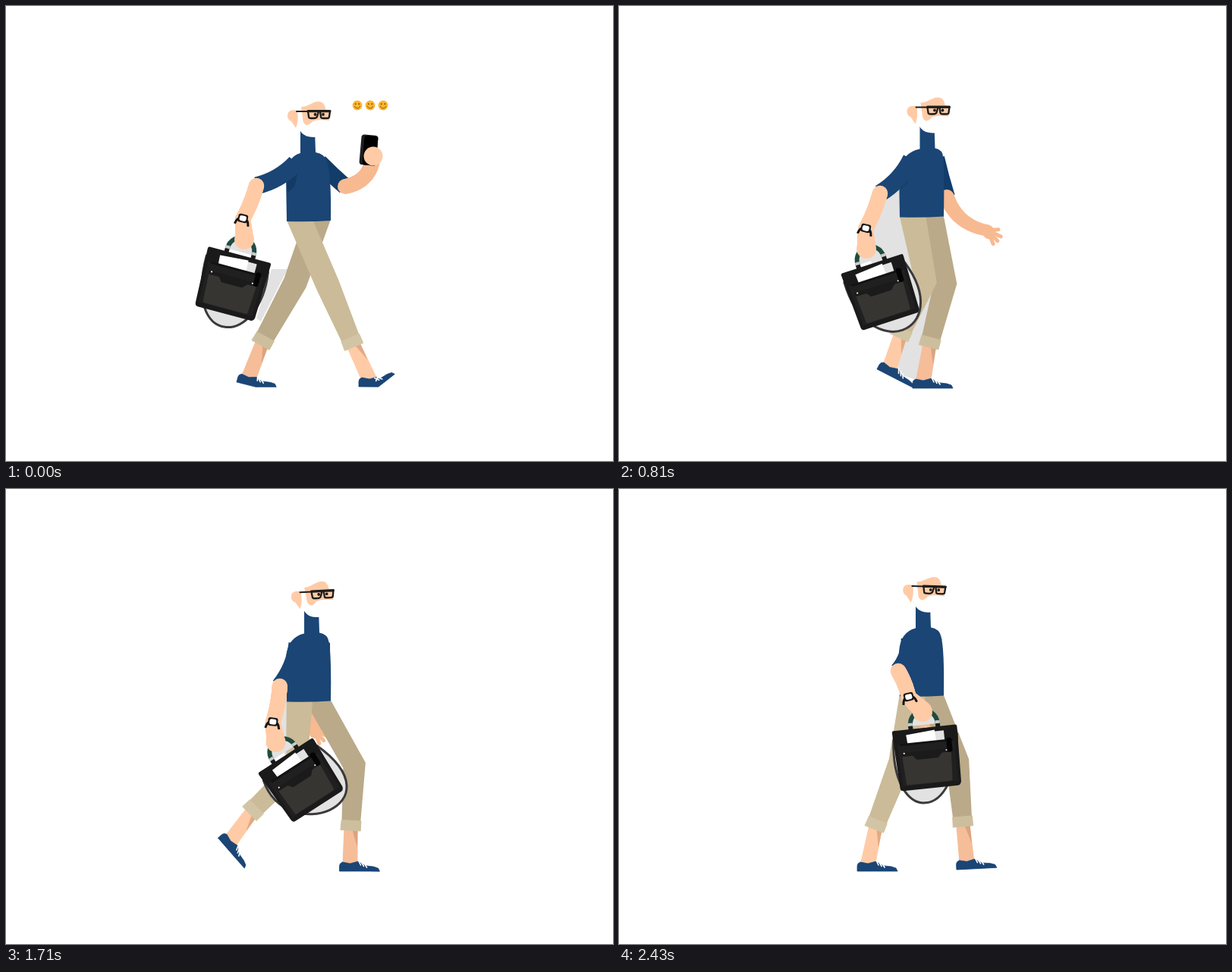
Animation of 800x600 px, one loop 2460 ms. Source, as an HTML page with a canvas:

```html
<!DOCTYPE html>
<html lang="en">
<head>
<meta charset="utf-8">
<title>Walking man</title>
<style>
html, body { margin: 0; width: 100%; height: 100%; overflow: hidden; background: #fff; }
canvas { display: block; width: 800px; height: 600px; }
</style>
</head>
<body>
<canvas id="stage" width="800" height="600"></canvas>
<script>
const g = document.getElementById('stage').getContext('2d');
const LOOP = 2460, CYCLE = 1005, STEP = 30, RAD = Math.PI / 180;
const BLUE = '#1a4575', BLUE_FAR = '#123c69', SKIN = '#ffcba6', SKIN_FAR = '#f7ba91', GREY = '#e2e2e2';

// Every row starts with its phase in the walk cycle.
// Leg: knee x y, cuff x y, heel x y, foot angle, toe curl.
const LEG = [
  [0, 424, 368, 456, 443, 465, 502, 0, -38],
  [.195, 436, 364, 433, 443, 418.5, 504, 0, 0],
  [.27, 420, 370, 400, 446, 379, 504, 0, 0],
  [.306, 406, 366, 386, 443, 363, 504, 0, 0],
  [.418, 371, 360, 339, 442, 314, 504, 0, 0],
  [.5, 357, 365, 315, 441, 280, 496, 14, -14],
  [.698, 382, 367, 325, 423, 278, 460, 49, 0],
  [.77, 396, 366, 350, 432, 314, 471, 37, 0],
  [.806, 404, 363, 372, 431, 340, 479, 27, 0],
  [.918, 422, 360, 429, 438, 421, 502, -3, 0]
];
// Near arm: elbow, wrist, hand.
const ARM = [
  [0, 330, 237, 312, 281, 314, 306],
  [.194, 358, 258, 346, 306, 346, 330],
  [.27, 369, 261, 369, 306, 374, 330],
  [.418, 368, 240, 382, 275, 400, 292],
  [.5, 370, 238, 388, 272, 408, 288],
  [.70, 361, 260, 352, 308, 356, 332],
  [.806, 344, 247, 325, 294, 326, 318]
];
// Bag: tilt, then the two strap handles relative to the bag's top.
const BAG = [
  [0, 15, -76, 123, 26, 123],
  [.194, 26, -152, 80, 7, 138],
  [.27, 16, -118, 88, 2, 148],
  [.418, -6, -44, 128, 46, 128],
  [.70, -33, 1, 120, 151, 65],
  [.806, -18, -4, 135, 111, 90]
];
// Far arm: elbow, wrist, bow.
const FAR_ARM = [
  [0, 441, 256, 505, 303, 13],
  [.194, 423, 258, 443, 326, 5],
  [.418, 405, 245, 392, 305, 5],
  [.70, 417, 258, 405, 318, 5],
  [.806, 432, 252, 486, 296, 20]
];
// Body, once per step: lean, bob, head tilt.
const BODY = [[0, 0, 0, 0], [.2, 5, -3.5, -3], [.306, 8.5, -5.5, 0], [.418, 3, -10.5, 2]];

const mod = (a, n) => ((a % n) + n) % n;
const mix = (a, b, u) => a.map((v, i) => v + (b[i] - v) * u);
const ease = u => u * u * (3 - 2 * u);

// Smooth periodic curve through the rows.
function sample(rows, phase, period = 1) {
  const n = rows.length, p = mod(phase, period);
  let i = n - 1;
  while (rows[i][0] > p) i--;
  const row = k => rows[mod(k, n)];
  const time = k => row(k)[0] + Math.floor(k / n) * period;
  const slope = (k, c) => (row(k + 1)[c] - row(k)[c]) / (time(k + 1) - time(k));
  const tangent = (k, c) => {
    const h0 = time(k) - time(k - 1), h1 = time(k + 1) - time(k);
    return (slope(k - 1, c) * h1 + slope(k, c) * h0) / (h0 + h1);
  };
  const h = time(i + 1) - time(i), u = (p - time(i)) / h, w = ease(u);
  return row(i).slice(1).map((v, j) => v * (1 - w) + row(i + 1)[j + 1] * w +
    h * u * (1 - u) * ((1 - u) * tangent(i, j + 1) - u * tangent(i + 1, j + 1)));
}

function turn(x, y, deg) {
  const c = Math.cos(deg * RAD), s = Math.sin(deg * RAD);
  return [x * c - y * s, x * s + y * c];
}
function right(a, b) {
  const x = b[0] - a[0], y = b[1] - a[1], l = Math.hypot(x, y) || 1;
  return [y / l, -x / l];
}
const off = (p, n, d) => [p[0] + n[0] * d, p[1] + n[1] * d];
// Control point bowed to the left of the way from a to b.
const bowed = (a, b, d) => off(mix(a, b, .5), right(a, b), -d);

function poly(color, pts, soft = 0) {
  g.beginPath();
  pts.forEach(p => g.lineTo(p[0], p[1]));
  g.closePath();
  g.fillStyle = color;
  g.fill();
  if (soft) stroke(color, soft);
}
function stroke(color, width, cap = 'round') {
  g.strokeStyle = color;
  g.lineWidth = width;
  g.lineCap = cap;
  g.lineJoin = 'round';
  g.stroke();
}
function line(color, width, a, b, cap) {
  g.beginPath();
  g.moveTo(...a);
  g.lineTo(...b);
  stroke(color, width, cap);
}
function dot(color, x, y, r) {
  g.beginPath();
  g.arc(x, y, r, 0, 7);
  g.fillStyle = color;
  g.fill();
}
function shape(color, d) {
  g.fillStyle = color;
  g.fill(new Path2D(d));
}
function box(color, x, y, w, h, r) {
  g.beginPath();
  g.roundRect(x, y, w, h, r);
  g.fillStyle = color;
  g.fill();
}
function curve(color, width, a, c, b) {
  g.beginPath();
  g.moveTo(...a);
  g.quadraticCurveTo(...c, ...b);
  stroke(color, width, 'butt');
}
// Rounded limb that tapers along a curve.
function tube(color, a, c, b, w0, w1) {
  for (let i = 0; i <= 40; i++) {
    const u = i / 40, p = mix(mix(a, c, u), mix(c, b, u), u);
    dot(color, p[0], p[1], (w0 + (w1 - w0) * u) / 2);
  }
}
function placed(x, y, deg, draw) {
  g.save();
  g.translate(x, y);
  g.rotate(deg * RAD);
  draw();
  g.restore();
}

function legPose(phase, dx) {
  const [kx, ky, cx, cy, hx, hy, angle, curl] = sample(LEG, phase);
  return { knee: [kx + dx, ky], cuff: [cx + dx, cy], heel: [hx + dx, Math.min(hy, 504)], angle, curl };
}

function drawLeg(leg, hip, cloth, hem, skin, shade) {
  const { knee, cuff, heel, angle, curl } = leg;
  const at = (x, y) => {
    if (x > 26) {
      const t = turn(x - 26, y, curl);
      x = 26 + t[0];
      y = t[1];
    }
    const t = turn(x, y, angle);
    return [heel[0] + t[0], heel[1] + t[1]];
  };
  const ankle = at(14, -9), na = right(cuff, ankle);
  const ns = right(knee, cuff), nk = mix(right(hip, knee), ns, .5);
  const along = [-ns[1], ns[0]];
  poly(skin, [off(cuff, na, -9), off(cuff, na, 9), off(ankle, na, 10), off(ankle, na, -10)]);
  poly(shade, [cuff, off(cuff, na, 9), off(mix(cuff, ankle, .55), na, 9)]);
  poly(cloth, [off(hip, [1, 0], -16.5), off(knee, nk, -15), off(cuff, ns, -11.5),
    off(cuff, ns, 11.5), off(knee, nk, 15), off(hip, [1, 0], 16.5)], 1.5);
  const top = off(cuff, along, -6), low = off(cuff, along, 7);
  poly(hem, [off(top, ns, -13), off(top, ns, 13), off(low, ns, 13), off(low, ns, -13)], 1);

  const sole = [[0, 0], [0, -7], [1, -10], [4, -12], [14, -10], [25, -13], [30, -9], [36, -7],
    [45, -6], [51, -4], [53, 0], [40, 0], [26, 0]].map(p => at(...p));
  poly(BLUE, sole, .8);
  for (let i = 0; i < 3; i++) line('#fff', 1.6, at(25 + 4 * i, -14 + 2 * i), at(28 + 4 * i, -8 + 1.5 * i));
}

function drawFarArm(t, phase, lean, bob) {
  let pose = sample(FAR_ARM, phase);
  const holds = t < 480;
  let phoneTilt = 5;
  if (holds) {
    const u = ease(Math.min(t / 270, 1)), v = ease(Math.max(0, (t - 270) / 210));
    const held = mix([447, 238, 484, 198, 20], [432, 257, 487, 248, 23], u);
    pose = mix(held, pose, v);
    phoneTilt += 80 * u + 50 * v;
  }
  const [ex, ey, hx, hy, bow] = pose, elbow = [ex, ey], hand = [hx, hy];
  const shoulder = [413 + lean * .6, 206 + bob];
  curve(BLUE_FAR, 22, shoulder, bowed(shoulder, elbow, 1), elbow);
  tube(SKIN_FAR, elbow, bowed(elbow, hand, bow), hand, 20, holds ? 20 : 15);
  if (holds) {
    placed(hx, hy, phoneTilt - 5, () => placed(-6, -8, 5, () => {
      box('#1d1f22', -11, -20, 22, 40, 4);
      box('#000', -7, -19, 18, 39, 3);
    }));
    dot(SKIN, hx, hy, 12.5);
  } else {
    dot(SKIN_FAR, hx + 2, hy + 3, 8.5);
    [-5, 25, 47, 68].forEach((a, i) => {
      const tip = turn(i ? 19 : 14, 0, a);
      line(SKIN_FAR, 5, hand, [hx + tip[0], hy + tip[1]]);
    });
  }
}

function drawTorso(d, y) {
  shape(BLUE, `M${388 + d} ${164 + y} L${407 + d} ${164 + y} L${408 + d} ${193 + y}
    Q${420 + d * .8} ${195 + y} ${423 + d * .5} ${205 + y} Q429 ${222 + y} 428 ${283 + y}
    Q400 ${285 + y} 370 ${284 + y} L369 ${225 + y} Q${370 + d * .3} ${199 + y} ${388 + d} ${194 + y}Z`);
  poly('#143a66', [[370, 223 + y], [386, 215 + y], [380, 238 + y], [371, 247 + y]]);
}

function drawHead(d, y, tilt) {
  placed(398 + d, 150 + y, tilt, () => {
    g.translate(-398, -150);
    shape('#fff', 'M384 148 Q384 173 405 173 Q424 173 428 150Z');
    shape(SKIN, 'M384 138 Q372 135 371 144 Q371 150 376 152 L382 161 Q386 152 384 138Z');
    shape(SKIN, 'M389 133 C398 133 404 126 412 126 Q420 126 421 136 L427 139 L426 151 ' +
      'Q412 149 404 152 Q400 157 396 157 Q391 155 391 147Z');
    line('#1c1c1c', 2, [383, 139], [399, 139]);
    const lens = new Path2D('M398 139 H412 L410 146 Q409 148 406 148 H402 Q399 148 399 146Z ' +
      'M414 139 H427 L426 146 Q426 148 423 148 H418 Q415 148 415 146Z');
    g.fillStyle = SKIN;
    g.fill(lens);
    g.strokeStyle = '#1c1c1c';
    g.lineWidth = 2.3;
    g.stroke(lens);
    line('#1c1c1c', 3, [398, 138.5], [427, 138.5]);
    dot('#1c1c1c', 407.5, 143, 1.9);
    dot('#1c1c1c', 418, 143, 1.9);
  });
}

function drawStrap(top, tilt, s) {
  const end = x => {
    const e = turn(x, 12, tilt);
    return [top[0] + e[0], top[1] + e[1]];
  };
  g.beginPath();
  g.moveTo(...end(-42));
  g.bezierCurveTo(top[0] + s[0], top[1] + s[1], top[0] + s[2], top[1] + s[3], ...end(42));
  g.fillStyle = GREY;
  g.fill();
  stroke('#3b393a', 3);
}

function drawBag() {
  const arch = new Path2D('M-18 -4 C-18 -29 18 -29 18 -4');
  g.fillStyle = GREY;
  g.fill(arch);
  g.strokeStyle = '#1f4b40';
  g.lineWidth = 6;
  g.lineCap = 'butt';
  g.stroke(arch);
  for (const x of [-18, 18]) {
    line('#c9cccc', 6, [x, -8], [x, -4], 'butt');
    line('#1a1a1a', 6, [x, -4], [x, 4], 'butt');
  }
  shape('#1a1a1a', 'M-41 0 H41 Q43 0 43 3 L41 75 Q40 80 36 80 H-36 Q-40 80 -40 75 L-43 3 Q-43 0 -41 0Z');
  shape(GREY, 'M10 6 H25 V20 H10Z');
  shape('#fff', 'M-25 7 L13 4 L14 21 H-24Z');
  shape('#202020', 'M-38 19 H38 L37 74 H-36Z');
  shape('#131313', 'M-34 18 H36 V21 H-34Z');
  shape('#373532', 'M-33 34 H32 L30 71 Q30 73 27 73 H-29 Q-31 73 -31 71Z');
  shape('#1b1b1b', 'M-33 30 H32 V35 H20 L14 41 H-14 L-19 35 H-33Z');
  dot('#eee', -30, 31, 1.1);
  dot('#eee', 26, 32, 1.1);
  box('#050505', 27, 16, 7, 19, 3);
}

function drawNearArm(elbow, wrist, hand, d, y) {
  const shoulder = [382 + d * .4, 207 + y];
  curve(BLUE, 23, shoulder, bowed(shoulder, elbow, -9), elbow);
  tube(SKIN, elbow, bowed(elbow, wrist, -3), wrist, 20.5, 20);
  tube(SKIN, wrist, mix(wrist, hand, .5), hand, 20, 24);
  dot(SKIN, hand[0], hand[1] + 2, 13);
  const aim = Math.atan2(wrist[1] - elbow[1], wrist[0] - elbow[0]) / RAD - 90;
  placed(wrist[0], wrist[1], aim * .6, () => {
    g.beginPath();
    g.moveTo(-9, 8);
    g.quadraticCurveTo(-8, -1, 0, -2);
    g.quadraticCurveTo(8, -1, 9, 8);
    stroke('#151515', 3, 'butt');
    box('#151515', -6.5, -6.5, 13, 11, 3);
    box('#fff', -4.5, -4.5, 9, 7, 2.5);
  });
}

function drawEmoji(t) {
  if (t >= 210) return;
  g.globalAlpha = Math.min(1, (210 - t) / 120);
  for (const x of [463, 480, 497]) {
    placed(x, 131 - t * .085, 0, () => {
      dot('#fbb52d', 0, 0, 6.4);
      dot('#6d4213', -2.3, -1.8, .9);
      dot('#6d4213', 2.3, -1.8, .9);
      g.beginPath();
      g.arc(0, 0, 3.8, .35, 2.8);
      stroke('#8a5518', 1);
    });
  }
  g.globalAlpha = 1;
}

// Grey patches that show through closed gaps.
function drawGaps(p, near, far, elbow, hand, top, tilt, y) {
  const corner = turn(40, 40, tilt);
  if (p > .12 && p < .92) {
    poly(GREY, [[372, 232 + y], elbow, hand, top, [top[0] + corner[0], top[1] + corner[1]],
      [398, 345], [400, 300 + y]]);
  } else if (p < .08 || p > .95) {
    poly(GREY, [[350, 347], [371, 347], [336, 416], [330, 412]]);
  }
  if (p > .15 && p < .24) poly(GREY, [[420, 290], [440, 340], [424, 380], [414, 380]]);
  if (Math.abs(near.heel[0] - far.heel[0]) < 50) {
    const foot = l => {
      const a = turn(20, -6, l.angle);
      return [l.heel[0] + a[0], l.heel[1] + a[1]];
    };
    poly(GREY, [near.knee, near.cuff, foot(near), foot(far), far.cuff, far.knee]);
  }
}

function draw(t) {
  const p = (t / CYCLE) % 1;
  let [lean, bob, nod] = sample(BODY, p, .5);
  if (t < 540) bob += 6.5 * Math.sin(Math.PI * t / 540) ** 2;
  const near = legPose(p, 0), far = legPose(p + .5, 24);
  const a = sample(ARM, p), [tilt, ...strap] = sample(BAG, p);
  const elbow = a.slice(0, 2), wrist = a.slice(2, 4), hand = a.slice(4);
  const drop = turn(0, 23, tilt), top = [hand[0] + drop[0], hand[1] + drop[1]];

  g.fillStyle = '#fff';
  g.fillRect(0, 0, 800, 600);
  drawGaps(p, near, far, elbow, hand, top, tilt, bob);
  drawFarArm(t, p, lean, bob);
  drawLeg(far, [410.5, 282 + bob], '#baaa89', '#cdbf9e', '#f6bd99', '#d9a481');
  drawLeg(near, [387, 282 + bob], '#cbbb99', '#d2c5a5', SKIN, '#e0aa85');
  drawTorso(lean, bob);
  drawHead(lean, bob, nod);
  drawStrap(top, tilt, strap);
  placed(top[0], top[1], tilt, drawBag);
  drawNearArm(elbow, wrist, hand, lean, bob);
  drawEmoji(t);
}

const start = performance.now();
function tick() {
  const t = (performance.now() - start) % LOOP;
  draw(Math.floor(t / STEP) * STEP);
  requestAnimationFrame(tick);
}
tick();
</script>
</body>
</html>
```
